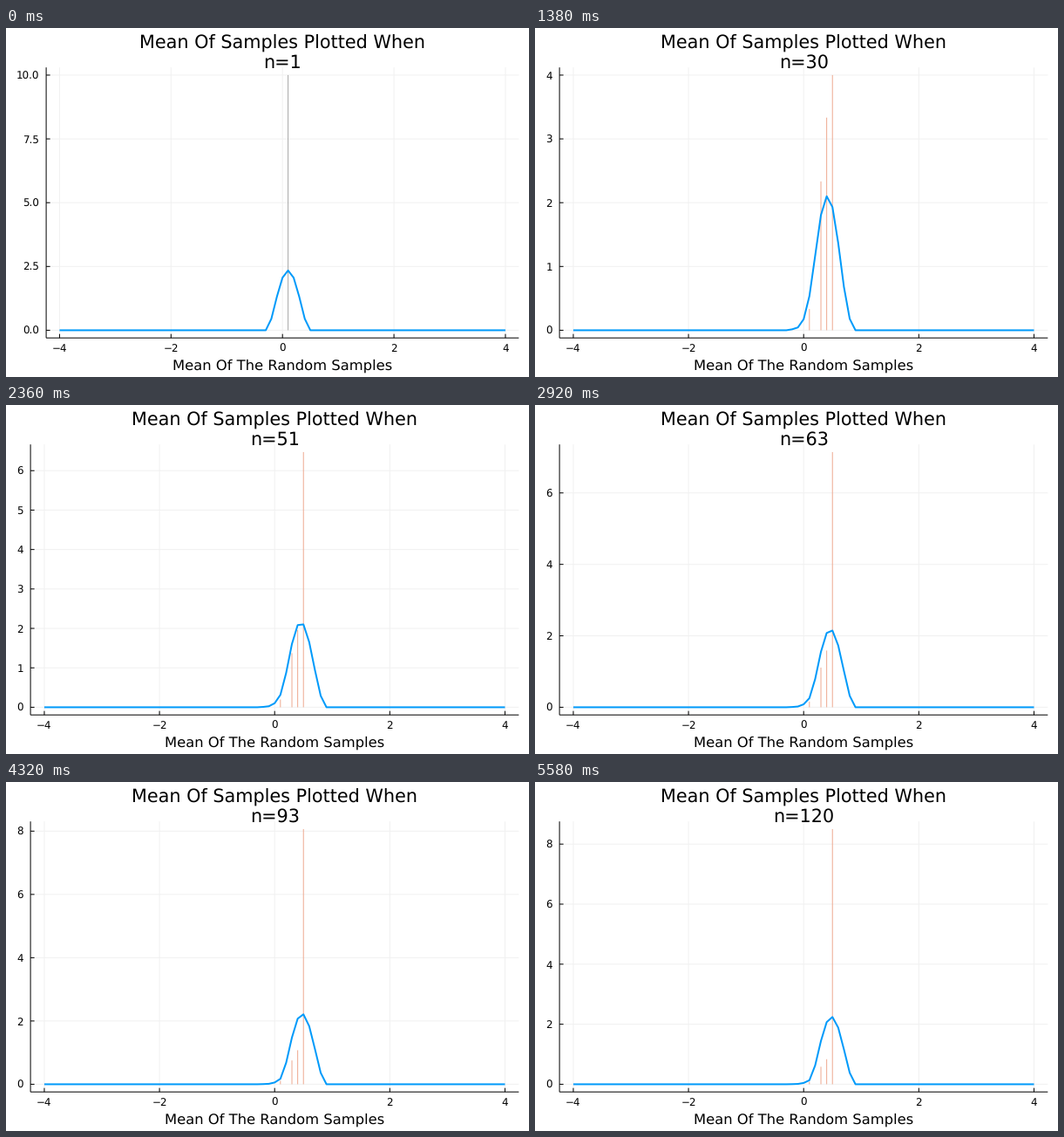
Recreate the animation shown at these times as a matplotlib script. Size 600x400 px, loop 5680 ms.

```python
import matplotlib.pyplot as plt
import numpy as np
from matplotlib.animation import FuncAnimation

plt.rcParams.update({
    "font.family": "DejaVu Sans",
    "lines.solid_capstyle": "butt",
    "text.hinting": "no_hinting",
    "path.snap": False,
})

W, H, DPI = 600, 400, 100
PX = 72 / DPI                       # points per pixel
TOP, BOTTOM, RIGHT = 45.2, 355.2, 588.3
TITLE, GUIDE, TICK = 20.79, 16.33, 11.88
BLUE, ORANGE, GRAY, GRID = "#009afa", "#eeaa91", "#a8a8a8", "#f1f1f1"
TICK_LEN = 4.5
TOTAL, STEP_MS = 120, 20
BANDWIDTH, BIN = 0.4, 0.1

# Running mean of uniform samples, rounded to one decimal
means = np.repeat([0.1, 0.3, 0.4, 0.5], [1, 7, 10, TOTAL - 18])
grid_x = np.linspace(-4, 4, 81)

# Every third count, and the last one, is held for 100 ms
counts = np.arange(1, TOTAL + 1)
holds = np.where((counts % 3 == 2) | (counts == TOTAL), 5, 1)
timeline = np.repeat(counts, holds)

fig = plt.figure(figsize=(W / DPI, H / DPI), dpi=DPI, facecolor="white")
ax = fig.add_axes([0, 0, 1, 1])
ax.set(xlim=(0, W), ylim=(H, 0))
ax.axis("off")
artists = []
shown = None


def line(x, y, color="black", width=1.0, z=2):
    artists.extend(ax.plot(x, y, color=color, lw=width * PX, zorder=z,
                           snap=False))


def label(x, y, s, size, ha="center"):
    artists.append(ax.text(x, y, s, fontsize=size * PX, ha=ha, va="baseline"))


def density(data):
    """Biweight kernel density on the plotting grid."""
    u = (grid_x[:, None] - data) / BANDWIDTH
    kernel = 15 / 16 * np.clip(1 - u ** 2, 0, None) ** 2
    return kernel.mean(axis=1) / BANDWIDTH


def y_ticks(limit):
    step = 1 if limit < 7 else 2 if limit < 10 else 2.5
    ticks = np.arange(0, limit, step)
    return ticks, "{:.1f}" if step == 2.5 else "{:.0f}"


def left_edge(ticks, fmt):
    if fmt == "{:.1f}":
        return 46.1
    return 28.1 if 4 in ticks else 27.8


def draw(n):
    data = means[:n]
    values, freq = np.unique(data, return_counts=True)
    heights = freq / n / BIN
    peak = heights.max()
    ticks, fmt = y_ticks(1.03 * peak)
    left = left_edge(ticks, fmt)
    mid = (left + RIGHT) / 2

    def to_x(v):
        return mid + v * (RIGHT - left) / 8.48

    def to_y(v):
        return BOTTOM - (v / peak + 0.03) * (BOTTOM - TOP) / 1.06

    for v in (-4, -2, 0, 2, 4):
        x = to_x(v)
        line([x, x], [TOP, BOTTOM], GRID, z=1)
        line([x, x], [BOTTOM, BOTTOM - TICK_LEN])
        label(x, 371.2, str(v).replace("-", "\u2212"), TICK)
    for v in ticks:
        y = to_y(v)
        line([left, RIGHT], [y, y], GRID, z=1)
        line([left, left + TICK_LEN], [y, y])
        label(left - 8, y + 4.8, fmt.format(v), TICK, ha="right")
    line([left, left], [TOP, BOTTOM])
    line([left, RIGHT], [BOTTOM, BOTTOM])

    for v, h in zip(values, heights):
        line([to_x(v)] * 2, [to_y(0), to_y(h)], GRAY if n == 1 else ORANGE, z=3)
    line(to_x(grid_x), to_y(density(data)), BLUE, 2, z=4)

    label(mid, 23.8, "Mean Of Samples Plotted When", TITLE)
    label(mid, 46.2, f"n={n}", TITLE)
    label(mid, 392, "Mean Of The Random Samples", GUIDE)


def update(i):
    global shown
    n = int(timeline[i])
    if n != shown:
        while artists:
            artists.pop().remove()
        draw(n)
        shown = n
    return artists


anim = FuncAnimation(fig, update, frames=len(timeline), interval=STEP_MS,
                     init_func=lambda: update(0), repeat=True, repeat_delay=0)
plt.show()
```
